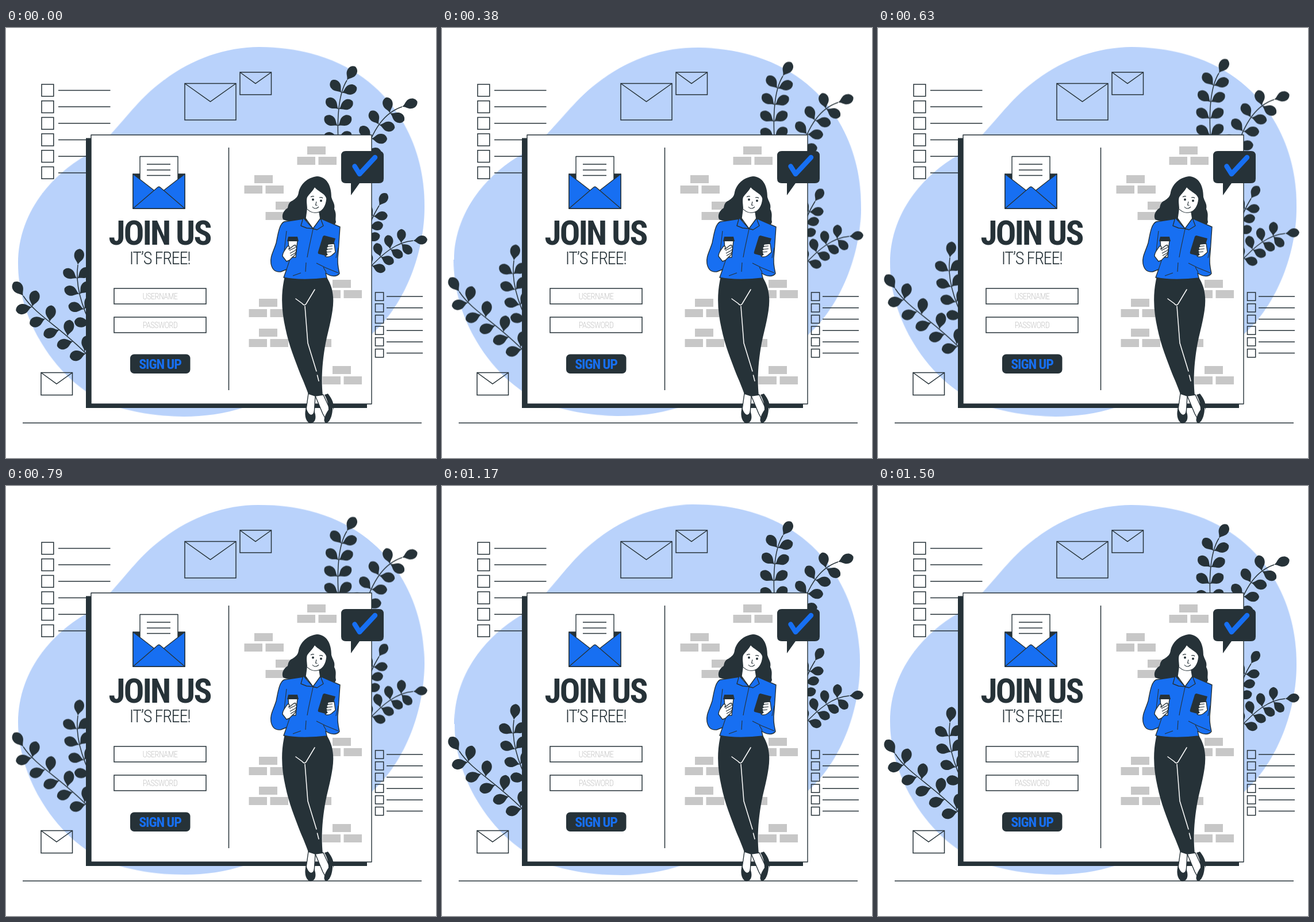
An HTML page for the animation above (1540 ms loop, 748 by 748 pixels).

```html
<!DOCTYPE html>
<html lang="en">
<head>
<meta charset="utf-8">
<title>Join us</title>
<style>
html, body { margin: 0; width: 100%; height: 100%; overflow: hidden; background: #fff; }
svg { display: block; width: 748px; height: 748px; --dark: #263238; --blue: #176ff2; --grey: #c7c7c7; }
.ln { fill: none; stroke: var(--dark); stroke-width: 1.5; }
.thin { stroke-width: 1.1; }
.d { fill: var(--dark); }
.b { fill: var(--blue); }
.g { fill: var(--grey); }
.w { fill: #fff; }
.o { stroke: var(--dark); stroke-width: 1.4; stroke-linejoin: round; stroke-linecap: round; }
text { font-family: "Roboto Condensed", Roboto, "Open Sans", sans-serif; font-stretch: 75%; letter-spacing: -.045em; text-anchor: middle; }
#blob { fill: #b9d2fb; transform-origin: 374px 374px; animation: sway 1540ms -5ms infinite; }
#plants { animation: float 1540ms -5ms infinite; }
/* 24 fps: 36 moving frames and one held */
@keyframes float {
  0% { transform: translateY(0); animation-timing-function: steps(17); }
  45.946% { transform: translateY(-14.17px); animation-timing-function: steps(18); }
  94.595% { transform: translateY(.83px); animation-timing-function: steps(1); }
  97.297%, 100% { transform: translateY(0); }
}
@keyframes sway {
  0% { transform: rotate(.11deg); animation-timing-function: steps(8); }
  21.622% { transform: rotate(1deg); animation-timing-function: steps(18); }
  70.27% { transform: rotate(-1deg); animation-timing-function: steps(9); }
  94.595% { transform: rotate(0deg); animation-timing-function: steps(1); }
  97.297%, 100% { transform: rotate(.11deg); }
}
</style>
</head>
<body>
<svg viewBox="0 0 748 748">
  <defs>
    <path id="leaf" d="M0 0C.25-.06 .3-.31 .62-.31C.84-.31 .97-.16 1 0C.97 .16 .84 .31 .62 .31C.3 .31 .25 .06 0 0Z"/>
    <path id="bricks" d="M0 0h32v14h-32zM-17.500 18h31.500v14h-31.500zM19.500 18h31.500v14h-31.500z"/>
  </defs>

  <path id="blob" d="M440 33C560 33 640 85 682 150C715 200 728 255 728 310C728 390 695 478 640 529C560 600 480 640 415 660C380 671 345 676 310 676C262 676 220 668 185 657C90 620 21 510 21 410C21 330 70 262 139 222C155 212 168 200 181 186C215 149 235 120 270 94C320 55 380 33 440 33Z"/>

  <g class="ln">
    <path d="M29 687H723"/>
    <g id="lists"></g>
    <path d="M311 96.500h89v63.500h-89zl44.500 31.500 44.500-31.500M407 77h54.500v39h-54.500zl27 19.500 27.500-19.500M61 599.500h54.500v39h-54.500zl27 19.500 27.500-19.500"/>
  </g>

  <g id="plants" class="d"></g>

  <path class="d" d="M139 191.500H628V661H139z"/>
  <path class="w o" d="M148 186H636V654H148z"/>
  <path class="ln" d="M387.500 208V630"/>

  <path class="d o" d="M221 254h90v60h-90z"/>
  <path class="w o" d="M233 223.500h66v80h-66z"/>
  <path class="ln" d="M245 237h41M245 247h41M245 256.500h41"/>
  <path class="b o" d="M221 254L266 289L311 254V314H221z"/>
  <path class="b o" d="M221 314L264 277Q266 275.500 268 277L311 314z"/>

  <text class="d" x="267" y="376.500" font-size="59" font-weight="700">JOIN US</text>
  <text class="d" x="267.500" y="411" font-size="30.500" font-weight="300">IT’S FREE!</text>
  <path class="ln" d="M188 453H348V480H188zM188 503H348V530H188z"/>
  <g class="g" font-size="14.500" font-weight="300">
    <text x="268" y="472">USERNAME</text>
    <text x="268" y="522">PASSWORD</text>
  </g>
  <rect class="d" x="216" y="567.500" width="104.500" height="33.500" rx="7"/>
  <text class="b" x="268" y="593" font-size="24" font-weight="700">SIGN UP</text>

  <g class="g">
    <use href="#bricks" x="524" y="206"/>
    <use href="#bricks" x="432" y="256"/>
    <use href="#bricks" x="469" y="302"/>
    <use href="#bricks" x="568" y="438"/>
    <use href="#bricks" x="440" y="471"/>
    <use href="#bricks" x="440" y="523"/>
    <use href="#bricks" x="568" y="588"/>
    <path d="M535 541h31v14h-31z"/>
  </g>

  <path class="d" d="M591 214H649Q657 214 657 222V262Q657 270 649 270H615L600 291V270H591Q583 270 583 262V222Q583 214 591 214z"/>
  <path d="M606.500 240.500L615 254L642 225" fill="none" stroke="#176ff2" stroke-width="8.500" stroke-linecap="round" stroke-linejoin="round"/>

  <g id="woman">
    <path class="d" d="M541 258C524 260 512 272 509 286C508 294 503 297 499 300C491 303 491 309 490 313C482 318 479 326 482 333C490 338 505 334 520 335L548 342C558 348 573 346 574 337C572 331 576 324 571 315C573 306 568 302 566 294C566 274 558 259 541 258z"/>
    <path class="w o" d="M537 276C532 286 525 289 523 295C521 303 524 310 523 316L521 331L534 349L547 333L545 320C553 316 557 308 558 297C556 289 550 287 545 283Q539 279 537 276z"/>
    <path class="ln thin" d="M524 315Q532 324 545 320M533 311Q538 317 544 311M540 302l-1.500 6 3 .5M530 294q3-2 6-1M545 295q4-1 6 1"/>
    <circle class="d" cx="534" cy="298.500" r="1.900"/>
    <circle class="d" cx="548" cy="300.500" r="1.900"/>

    <path class="d" d="M485 432C477 465 480 495 486 522C492 552 503 578 512 602C518 616 523 628 526 637L538 640L551 639C548 612 550 580 556 548C562 520 571 490 569 468C568 452 563 442 557 432z"/>
    <path d="M537 455L522 480Q519 484 515 479L504 471M520 484L525 548L540 597M541.500 604L544 614" fill="none" stroke="#fff" stroke-width="1.500" stroke-linecap="round"/>

    <path class="w o" d="M526 636L522 664L527 676L536 673L538 640z"/>
    <path class="w o" d="M538 640L551 671L556 680L564 664L552 638z"/>
    <path class="d" d="M522 660C519 670 520 682 527 687C535 689 540 683 538 672L536 665C535 675 527 677 522 660z"/>
    <path class="d" d="M554 638L560 636C568 646 571 654 570 665L568 657C569 673 563 688 556 687C551 684 554 674 561 664C561 653 558 645 554 638z"/>

    <path class="b o" d="M517 332L484 337C475 341 473 360 470 374C465 390 459 398 461 410C463 421 469 425 478 424L488 420L483 434C503 439 536 438 558 435L556 426C563 432 575 434 580 427C577 413 576 405 578 390L581 346L549 332L535 350z"/>
    <path class="b o" d="M517 330L513 344L523 348L534 349zM547 331L552 344L541 351L534 349z"/>
    <path class="ln thin" d="M534 350C530 370 526 385 524 399M522 408L521 424M488 353L484 388M488 420L494 402M578 382L574 400M540 409L556 417L578 426M552 416L557 425M499 431L513 426"/>

    <path class="w o" d="M491 370H507L504 399H493z"/>
    <path class="d" d="M491 363H507L509 371H489z"/>
    <path class="w o" d="M481 397C481 390 485 387 488 382Q491 377 493 381L492 385L501 378Q506 377 504 381Q507 383 504 386Q506 389 503 391Q504 395 500 397L493 404L488 406z"/>
    <path class="ln thin" d="M503 382L493 387M503 387L494 392M502 392L495 396"/>

    <path class="d" d="M554 361L573 366L564 396Q562 398 559 397L544 393Q542 392 543 389L551 363Q552 361 554 361z"/>
    <path class="w o" d="M571 375L561 376Q558 378 560 380Q556 382 559 385Q555 387 558 389Q556 391 559 394L555 397Q559 400 566 396L573 390z"/>
    <path class="ln thin" d="M560 380L568 379M559 385L568 384M558 390L566 389"/>
  </g>
</svg>
<script>
const add = (parent, tag, attrs) => {
  const el = document.createElementNS("http://www.w3.org/2000/svg", tag);
  for (const k in attrs) el.setAttribute(k, attrs[k]);
  return parent.appendChild(el);
};
const $ = id => document.getElementById(id);

// six rows: box plus rule
function list(x, y, size, gap, from, to) {
  let d = "";
  for (let i = 0; i < 6; i++) {
    const top = y + i * gap;
    d += `M${x} ${top}h${size}v${size}h${-size}zM${from} ${top + size / 2}H${to}`;
  }
  add($("lists"), "path", { d });
}
list(62, 98, 20.8, 28.7, 91, 181.5);
list(642.5, 460, 14.2, 19.7, 662, 725);

// A stem drawn from its tip down, a leaf on the tip and evenly spaced
// leaves on both sides, turned away from the stem by a fixed angle.
function plant(d, size, spread, leftGap, rightGap = leftGap) {
  const g = add($("plants"), "g", {});
  const stem = add(g, "path", { d, class: "ln" });
  const end = stem.getTotalLength();
  const leaf = (s, turn) => {
    const p = stem.getPointAtLength(s), q = stem.getPointAtLength(s + 2);
    const deg = Math.atan2(p.y - q.y, p.x - q.x) * 180 / Math.PI + turn;
    add(g, "use", { href: "#leaf", transform: `translate(${p.x} ${p.y}) rotate(${deg}) scale(${size})` });
  };
  leaf(0, 0);
  const side = (gap, turn) => {
    for (let s = size * 0.85; s < end - 2; s += gap) leaf(s, turn);
  };
  side(leftGap, -spread);
  side(rightGap, spread);
}
plant("M593 91C578 115 574 160 580 225", 28, 55, 29);
plant("M689 137C662 146 638 170 620 235", 28, 66, 28);
plant("M649 309C640 324 632 338 626 370", 25, 62, 21);
plant("M708 370C680 372 655 392 630 420", 25, 66, 21.5);
plant("M125 412C121 440 126 475 152 525", 28, 56, 27.5);
plant("M30 466C52 500 95 520 145 572", 29, 58, 31, 40);
</script>
</body>
</html>
```
